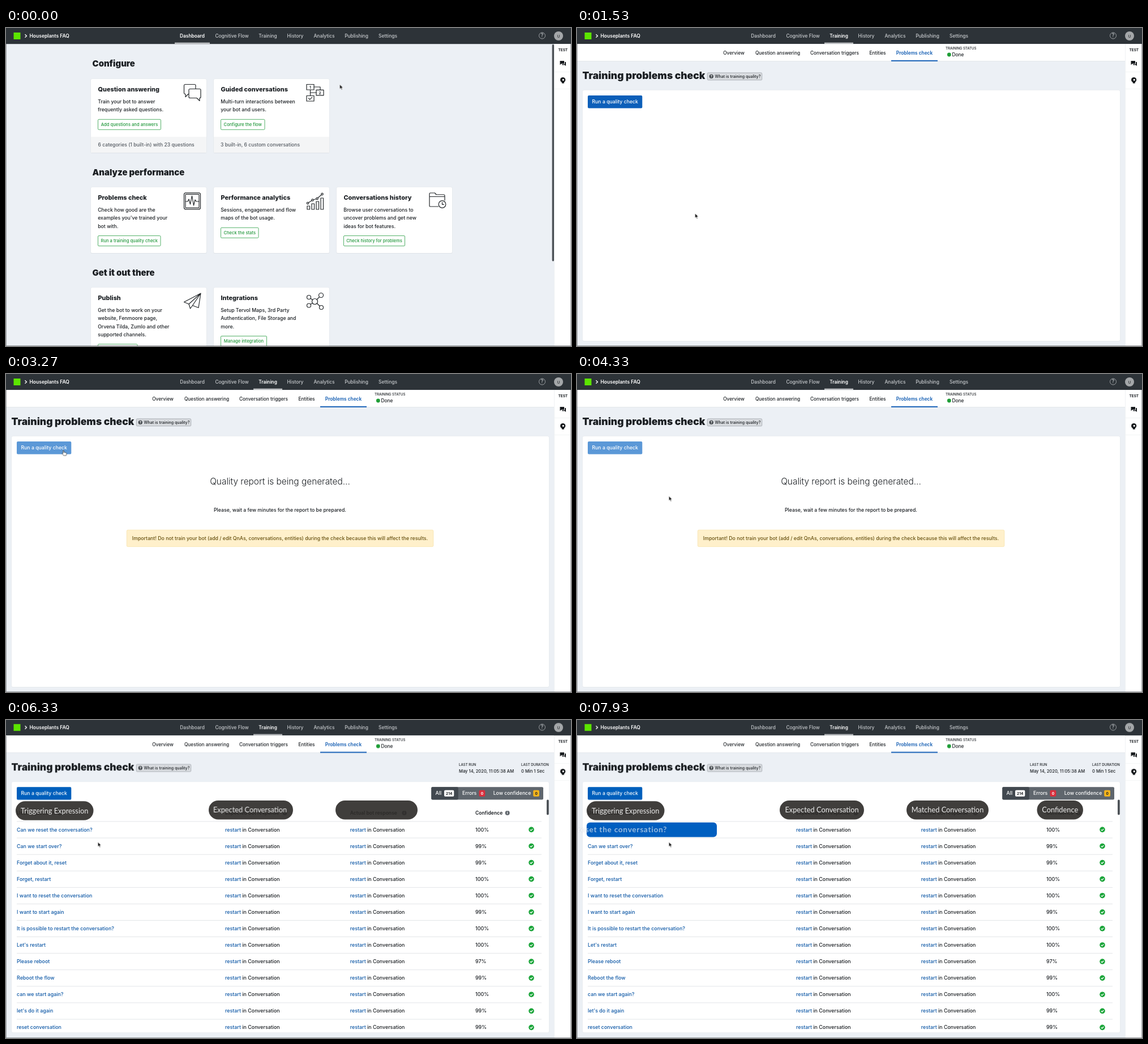
These frames come from a looping animation (998x561 px, 8 s). An HTML page:

```html
<!DOCTYPE html>
<html lang="en">
<head>
<meta charset="utf-8">
<title>Bot training quality check</title>
<style>
html, body { margin: 0; width: 100%; height: 100%; overflow: hidden; background: #ecf0f5; }
svg { display: block; width: 100vw; height: 100vh; font: 450 8.72px Inter, sans-serif; font-optical-sizing: none; fill: #1b1f23; }
text { white-space: pre; }
.mid { text-anchor: middle; }
.h1 { font-size: 17.5px; font-weight: 900; }
.h2 { font-size: 14.9px; font-weight: 900; }
.h3 { font-size: 10.9px; font-weight: 800; }
.light { font-size: 15.4px; font-weight: 300; }
.nav { font-size: 8.4px; fill: #c9cccf; }
.on { font-size: 8.3px; font-weight: 600; fill: #fff; }
.app { font-size: 8.5px; font-weight: 600; fill: #fff; }
.sub { font-size: 8.3px; font-weight: 500; }
.sel { font-weight: 600; fill: #115cb2; }
.cap { font-size: 6.1px; }
.val { font-size: 7.6px; }
.note { fill: #555b62; font-size: 8.62px; }
.btn { font-size: 7.6px; font-weight: 500; fill: #20973a; }
.white { fill: #fff; }
.tiny { font-size: 6.5px; font-weight: 700; }
.th { font-size: 8.6px; font-weight: 600; }
.row { font-size: 8.88px; }
.link { fill: #0e58a6; }
.warn { fill: #66500f; }
.hint { font-size: 7.05px; }
.url { font-size: 7.05px; font-weight: 400; fill: #c8cacc; }
.icon { fill: none; stroke: #222629; stroke-width: 1.2; stroke-linejoin: round; stroke-linecap: round; }
.icon .solid { fill: #fff; }
.icon text { fill: #222629; stroke: none; }

/* hard changes */
#app, .cut, #run { animation: 8s step-end infinite; }
#app { animation-name: nudge; }
#home { animation-name: home; }
#train { animation-name: train; }
#idle { animation-name: idle; }
#busy { animation-name: busy; }
#table { animation-name: table; }
#hot { animation-name: hot; }
#clicked { animation-name: clicked; }
#run { animation-name: run; }
#arrow { animation-name: arrow; }
#hand { animation-name: hand; }
@keyframes nudge { 0% { transform: none } 57.5%, 100% { transform: translateY(-.8px) } }
@keyframes home { 0% { opacity: 1 } 18.4%, 100% { opacity: 0 } }
@keyframes train { 0% { opacity: 0 } 18.4%, 100% { opacity: 1 } }
@keyframes idle { 0% { opacity: 0 } 21.6% { opacity: 1 } 40%, 100% { opacity: 0 } }
@keyframes busy { 0% { opacity: 0 } 40% { opacity: 1 } 57.5%, 100% { opacity: 0 } }
@keyframes table { 0% { opacity: 0 } 57.5%, 100% { opacity: 1 } }
@keyframes hot { 0% { opacity: 0 } 7.5%, 100% { opacity: 1 } }
@keyframes clicked { 0% { opacity: 0 } 10.87%, 100% { opacity: 1 } }
@keyframes run {
  0% { fill: #0c5fb9 } 30% { fill: #0d50a2 } 33% { fill: #0b478f } 34.1% { fill: #0d50a2 }
  40% { fill: #5b98d7 } 57.5%, 100% { fill: #005fbc }
}
@keyframes arrow { 0% { opacity: 1 } 7.6% { opacity: 0 } 12% { opacity: 1 } 30% { opacity: 0 } 44.5%, 100% { opacity: 1 } }
@keyframes hand { 0% { opacity: 0 } 7.6% { opacity: 1 } 12% { opacity: 0 } 30% { opacity: 1 } 44.5%, 100% { opacity: 0 } }

/* smooth motion */
#cursor { animation: move 8s ease-in-out infinite; }
@keyframes move {
  0%, 2.5% { transform: translate(589.5px, 99.5px) }
  8.375%, 10.87% { transform: translate(209px, 371px) }
  14.5%, 21.6% { transform: translate(208.5px, 327px) }
  31%, 43.75% { transform: translate(101.5px, 134.5px) }
  52.5%, 100% { transform: translate(162.3px, 215.3px) }
}
.pill { --late: calc(var(--at) + 120ms); animation: show 8s var(--at) infinite backwards; }
.pill text {
  font: 12.8px Lato, sans-serif; fill: #ececec;
  animation: slide 8s var(--late) infinite backwards, fade 8s linear var(--late) infinite backwards;
}
.pill .strong { font-size: 13.6px; font-weight: 700; letter-spacing: .75px; fill: #fff; text-shadow: 0 0 2px rgba(0, 40, 90, .35); }
@keyframes show { 0% { opacity: 0 } 1.2%, 100% { opacity: 1 } }
@keyframes fade { 0% { opacity: 0 } 3.5%, 100% { opacity: 1 } }
@keyframes slide {
  0% { transform: translateX(var(--from)); animation-timing-function: cubic-bezier(.5, 1, .89, 1) }
  7.5%, 100% { transform: none }
}
</style>
</head>
<body>
<svg id="stage" viewBox="0 0 998 561"></svg>
<script>
const text = (x, y, s, cls = '') => `<text x="${x}" y="${y}" class="${cls}">${s}</text>`;
const mid = (x, y, s, cls = '') => text(x, y, s, 'mid ' + cls);
const box = (x, y, w, h, fill, r = 0, more = '') =>
  `<rect x="${x}" y="${y}" width="${w}" height="${h}" rx="${r}" fill="${fill}" ${more}/>`;
const dot = (x, y, r, fill, more = '') => `<circle cx="${x}" cy="${y}" r="${r}" fill="${fill}" ${more}/>`;
const path = (d, more = '') => `<path d="${d}" ${more}/>`;
const icon = s => `<g class="icon">${s}</g>`;
const cut = (id, s) => `<g id="${id}" class="cut">${s}</g>`;
const lines = (x, y, list) => list.map((s, i) => text(x, y + i * 14.25, s)).join('');
const info = (x, y) => dot(x, y, 4, '#62686e') + mid(x, y + 2.3, 'i', 'tiny white');

const navItems = [['Cognitive Flow', 399], ['History', 511], ['Analytics', 562], ['Publishing', 619], ['Settings', 674.5]];
const navTab = (x, s, on) => mid(x, 17.4, s, on ? 'nav on' : 'nav');
const navBar = (x, w) => box(x, 25.6, w, 2.8, '#b9bcbf');

function shell() {
  return box(0, 0, 998, 563, '#ecf0f5') + box(0, 0, 998, 28.2, '#2d3338')
    + box(13.5, 8, 12, 12, '#5ce500')
    + path('M33.5 11.2l3 2.8-3 2.8', 'fill="none" stroke="#fff" stroke-width="1.3"')
    + text(41.5, 17, 'Houseplants FAQ', 'app')
    + navItems.map(([s, x]) => navTab(x, s)).join('')
    + dot(947, 13.5, 5.5, 'none', 'stroke="#9da1a4"') + mid(947, 16.3, '?', 'nav')
    + dot(976, 14, 8, '#a4a7a9') + mid(976, 16.5, 'U', 'cap')
    + box(968, 28.2, 30, 534, '#fff') + box(968, 28.2, .5, 534, '#dfe3e7')
    + box(969, 77, 29, .6, '#eceef0') + box(969, 107, 29, .6, '#eceef0')
    + mid(983.8, 41.2, 'TEST', 'tiny')
    + path('M978.500 58h7.500v5h-5l-2.500 2z', 'fill="#16191c"')
    + path('M987 60h2v7l-2-1.700h-5v-1.500h5z', 'fill="#16191c"')
    + dot(983.6, 91.6, 4.6, '#16191c') + box(981.8, 94, 4, 3.6, '#16191c')
    + dot(984.2, 91.4, 1.6, '#fff');
}

function button(x, y, w, s) {
  return box(x, y, w, 18, '#fff', 1.5, 'stroke="#2a9d43" stroke-width=".8"') + mid(x + w / 2, y + 11.9, s, 'btn');
}

function card(x, y, h, title, body, btn) {
  return box(x - .5, y - .3, 205, h + 1.2, '#dfe3e8', 2) + box(x, y, 204, h, '#fff', 2)
    + text(x + 12.5, y + 22.3, title, 'h3') + lines(x + 12.2, y + 43.2, body)
    + (btn ? button(x + 12.5, y + 57 + 14.25 * (body.length - 1), btn[1], btn[0]) : '');
}

function icons() {
  const bars = [[532, 6], [540, 10], [548, 14], [556, 20]];
  const trend = [[533, 309], [541.5, 303.5], [549.5, 301], [558.5, 293]];
  const nodes = [[535, 475, 3.5], [556.5, 471.5, 4], [535, 489.5, 3.5], [557, 493, 3.5]];
  return icon(
    path('M316 99.500h17a2 2 0 0 1 2 2v15h-13l-5 5v-5h-1a2 2 0 0 1-1.500-2v-13a2 2 0 0 1 1.500-2z')
    + path('M325 107.500h17a2 2 0 0 1 2 2v12a2 2 0 0 1-2 2v5l-5-5h-12a2 2 0 0 1-2-2v-12a2 2 0 0 1 2-2z', 'class="solid"')
    + path('M544 104h11v5M548 114h-10.500M537.500 109v10')
    + path('M531 99.500h13v9.500h-13zM548 109.300h13v9.500h-13zM531 119.500h13v9.500h-13zM534.500 124l2.200 2.200 4-4')
    + mid(537.5, 106.8, '1', 'tiny') + mid(554.5, 116.5, '2', 'tiny'))
  + icon(box(314.5, 290.8, 29, 29, 'none', 3) + box(317, 293.3, 24, 24, 'none', 1)
    + path('M317 306h4l2-4 2.500 9 3-15 3 17 2.500-10 2 3h5'))
  + icon(bars.map(([x, h]) => box(x, 320 - h, 4.5, h, 'none')).join('')
    + path('M' + trend.join('L')) + trend.map(([x, y]) => dot(x, y, 1.7, '#fff')).join(''))
  + icon(path('M748 314v-21.500q0-1.500 1.500-1.500h8l2.500 3h13q2 0 2 2v8M748 297.500h27M748 314q0 1 1.500 1h14')
    + dot(770.5, 311, 6.3, '#fff') + path('M770.500 307.500v3.800h3'))
  + icon(path('M344 468l-29.500 15.500 8.500 3.500zM344 468l-21 19 2.500 8 4-5.500zM344 468l-4 25.500-10.500-4M325.500 495l-2.500-8'))
  + icon(nodes.map(([x, y]) => path(`M545.500 482.500L${x} ${y}`)).join('')
    + dot(545.5, 482.5, 5, '#fff') + nodes.map(n => dot(...n, '#fff')).join(''));
}

function home() {
  const check = 'Run a training quality check';
  return navBar(298, 62) + navTab(329, 'Dashboard', true) + navTab(462.5, 'Training')
    + box(964.6, 29, 3.4, 382.5, '#4c5156', 1.7)
    + text(152.5, 68.4, 'Configure', 'h2') + text(152.5, 259.6, 'Analyze performance', 'h2')
    + text(152.5, 436.7, 'Get it out there', 'h2')
    + card(150, 90, 130, 'Question answering', ['Train your bot to answer', 'frequently asked questions.'], ['Add questions and answers', 111])
    + card(367, 90, 130, 'Guided conversations', ['Multi-turn interactions between', 'your bot and users.'], ['Configure the flow', 77.5])
    + box(150, 192, 204, 28, '#f4f5f6') + text(162.5, 208.6, '6 categories (1 built-in) with 23 questions', 'note')
    + box(367, 192, 204, 28, '#f4f5f6') + text(379, 208.6, '3 built-in, 6 custom conversations', 'note')
    + card(150, 281, 116, 'Problems check', ['Check how good are the', "examples you've trained your", 'bot with.'], [check, 110.5])
    + card(367, 281, 116, 'Performance analytics', ['Sessions, engagement and flow', 'maps of the bot usage.'], ['Check the stats', 66.5])
    + card(584, 281, 116, 'Conversations history', ['Browse user conversations to', 'uncover problems and get new', 'ideas for bot features.'], ['Check history for problems', 108])
    + card(150, 458, 140, 'Publish', ['Get the bot to work on your', 'website, Fenmoore page,', 'Orvena Tilda, Zumlo and other', 'supported channels.'], ['Publish now', 69.5])
    + card(367, 458, 140, 'Integrations', ['Setup Tervol Maps, 3rd Party', 'Authentication, File Storage and', 'more.'], ['Manage integration', 81])
    + icons()
    + cut('clicked', box(160.5, 365, 114.5, 21.5, '#a9dcb4', 3) + box(0, 549.3, 332, 12, '#2e3133', 2)
      + text(3, 558, 'https://bots.nativechat.com/bots/578bd93dc71346fba0a80532/training/quality', 'url'))
    + cut('hot', box(162, 366.2, 111.5, 18.9, '#1f9a3c', 1.5) + mid(217.8, 378.4, check, 'btn white'));
}

function train() {
  const tabs = [['Overview', 277], ['Question answering', 354.5], ['Conversation triggers', 455], ['Entities', 531], ['Problems check', 596]];
  return navTab(329, 'Dashboard') + navBar(437, 51) + navTab(462.5, 'Training', true)
    + box(0, 28.2, 968, 30, '#fff') + box(0, 58, 968, .7, '#dde1e5')
    + tabs.map(([s, x], i) => mid(x, 47.3, s, i === 4 ? 'sub sel' : 'sub')).join('')
    + box(555, 56.8, 82, 2, '#1a62b8')
    + text(651, 38.4, 'TRAINING STATUS', 'cap') + dot(657.3, 47, 3.4, '#1f9e37') + text(662.5, 50.2, 'Done', 'sub')
    + text(9.5, 90, 'Training problems check', 'h1')
    + box(230.3, 79, 96.4, 12.8, '#d9dce0', 1.5, 'stroke="#9ca1a7" stroke-width=".8"')
    + dot(237.3, 85.3, 3.6, '#41464b') + mid(237.3, 87.6, '?', 'tiny white')
    + text(243.5, 88.2, 'What is training quality?', 'hint')
    + box(9.5, 109.7, 950, 443, '#e2e6ea', 3) + box(10, 110, 949, 442, '#fff', 2.5)
    + `<g id="run">${box(19, 119, 96.3, 22.4, 'inherit', 2)}</g>` + mid(67.2, 133.2, 'Run a quality check', 'white')
    + cut('idle', mid(484, 194.5, 'Training quality report is not yet available', 'light')
      + text(342.5, 242.5, 'Run a new check to see if there are issues with the currently trained:')
      + text(342.5, 266.3, '- conversation trigger expressions') + text(342.5, 280.6, '- questions and answers'))
    + cut('busy', mid(484, 194.5, 'Quality report is being generated...', 'light')
      + mid(484, 242.5, 'Please, wait a few minutes for the report to be prepared.')
      + box(213.3, 275.2, 541.5, 29.4, '#fff0cb', 2, 'stroke="#f8e3aa" stroke-width=".8"')
      + mid(484, 293, 'Important! Do not train your bot (add / edit QnAs, conversations, entities) during the check because this will affect the results.', 'warn'));
}

function row(phrase, i, score) {
  const y = 193.4 + i * 29.08, b = y + 3.1;
  const reply = x => `<text x="${x}" y="${b}" class="row"><tspan class="link">restart</tspan> in Conversation</text>`;
  return box(19, y - 14.8, 927, .8, '#dcdfe3') + text(19, b, phrase, 'row link')
    + reply(387) + reply(607.7) + text(829, b, score + '%', 'row')
    + dot(928, y, 4.8, '#1ba53a')
    + path(`M925.700 ${y}l1.700 1.700 2.900-3`, 'fill="none" stroke="#fff" stroke-width="1.3"');
}

function pill(at, x, y, w, s) {
  return `<g class="pill" style="--at:${at}ms;--from:-75px">`
    + box(x, y, w, 33.5, '#2e2b29', 16.7, 'fill-opacity=".91"') + mid(x + w / 2, y + 21.3, s) + '</g>';
}

function table() {
  const phrases = ['Can we reset the conversation?', 'Can we start over?', 'Forget about it, reset', 'Forget, restart',
    'I want to reset the conversation', 'I want to start again', 'It is possible to restart the conversation?',
    "Let's restart", 'Please reboot', 'Reboot the flow', 'can we start again?', "let's do it again", 'reset conversation'];
  const scores = [100, 99, 99, 100, 100, 99, 100, 100, 97, 99, 100, 99, 99];
  const heads = [['User expression', 19, 95], ['Expected bot response', 387, 492.5], ['Actual bot response', 607.7, 703.5], ['Confidence', 829, 885.7]];
  return text(800, 81.3, 'LAST RUN', 'cap') + text(800, 93.4, 'May 14, 2020, 11:05:38 AM', 'val')
    + text(910, 81.3, 'LAST DURATION', 'cap') + text(910, 93.4, '0 Min 1 Sec', 'val')
    + box(751.3, 118.2, 197.7, 22.3, '#5f666d', 2) + box(751.3, 118.2, 47.5, 22.3, '#41484f', 2)
    + text(758.5, 132.4, 'All', 'white') + box(774, 123.8, 17.3, 11.3, '#fff', 2) + mid(782.7, 131.8, '214', 'tiny')
    + text(806, 132.4, 'Errors', 'white') + box(835.5, 123.8, 10.8, 11.3, '#d9303e', 2) + mid(840.9, 131.8, '0', 'tiny white')
    + text(860.7, 132.4, 'Low confidence', 'white') + box(931.2, 123.8, 10.8, 11.3, '#f6b41c', 2) + mid(936.6, 131.8, '0', 'tiny')
    + box(955, 140.5, 3.8, 27, '#4c5156', 1.9)
    + heads.map(([s, x, ix]) => text(x, 167.3, s, 'th') + info(ix, 164)).join('')
    + phrases.map((s, i) => row(s, i, scores[i])).join('')
    + pill(5000, 17, 143.3, 137.5, 'Triggering Expression')
    + pill(5700, 358, 142, 149, 'Expected Conversation')
    + pill(6220, 582, 142, 145, 'Matched Conversation')
    + pill(6950, 812.5, 142, 81.5, 'Confidence')
    + '<g class="pill" style="--at:7640ms;--from:-150px">' + box(17, 180.7, 230, 25.8, '#005fc0', 6)
    + text(25, 198.2, 'Can we reset the conversation?', 'strong') + '</g>';
}

const cursor = '<g id="cursor">'
  + cut('arrow', path('M0 0V8.200L1.900 6.500 3.100 9.400 4.500 8.800 3.300 6H5.800Z', 'fill="#111" stroke="#fff" stroke-width=".7"'))
  + cut('hand', path('M-.8 .6q.8-1 1.600 0v3l4 .9q1 .4 .8 1.500l-.8 3.300h-4.600l-2.600-3.500q.2-1.200 1.600-.2z', 'fill="#fff" stroke="#222" stroke-width=".7"'))
  + '</g>';

const edges = path('M.3 28V560.600H997.700V28', 'fill="none" stroke="#63686d" stroke-width=".7"');

document.getElementById('stage').innerHTML =
  `<g id="app">${shell()}${cut('home', home())}${cut('train', train())}</g>`
  + cut('table', table()) + edges + cursor;
</script>
</body>
</html>
```
